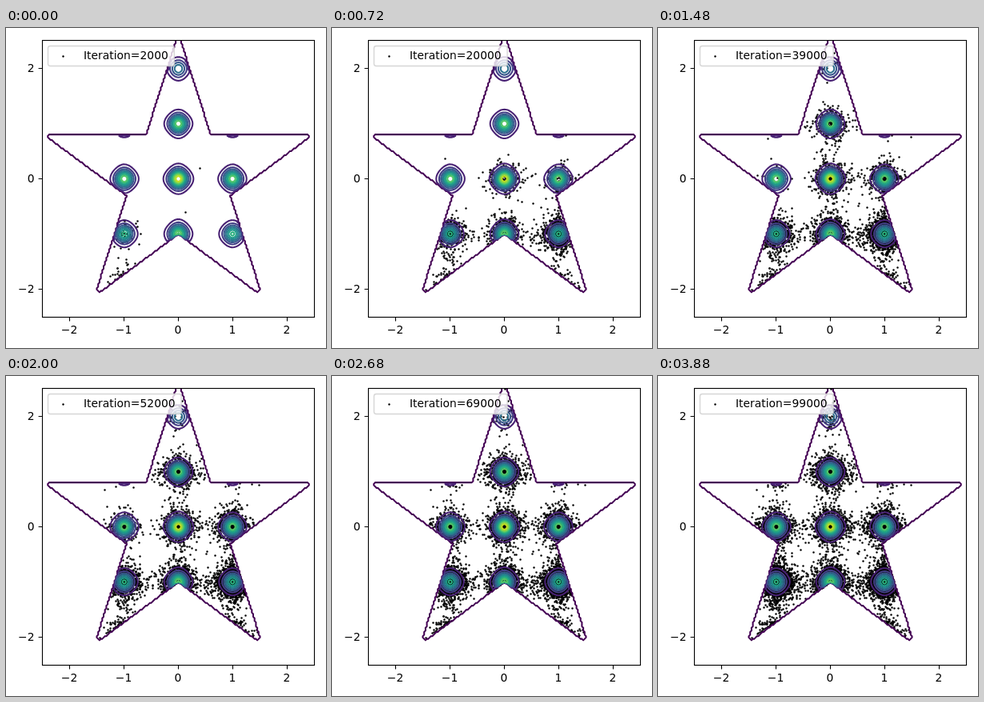
Recreate the animation shown at these times as an HTML page with a canvas. Size 400 px wide and 400 px high, loop 3.92 s.

```html
<!DOCTYPE html>
<html lang="en">
<head>
<meta charset="utf-8">
<title>Sampling a star-shaped density</title>
<style>
  html, body { margin: 0; width: 100%; height: 100%; overflow: hidden; background: #fff; }
  canvas { display: block; width: 400px; height: 400px; }
</style>
</head>
<body>
<canvas id="stage" width="400" height="400"></canvas>
<script>
const SIZE = 400, STEP = 40, STEPS = 98;
const BOX = { l: 45.5, t: 15.5, w: 340, h: 346 };
const FONT = '13.89px "DejaVu Sans", sans-serif';
const TEMP = 4.9, HEAT = 5.4;

// Cumulative sample counts per basin, at these steps
const KEYS = [0, 18, 37, 50, 67, 97];
const BASINS = [
  [-1, -1, 60, 450, 850, 950, 1400, 2300],
  [0, -1, 3, 500, 900, 1000, 1100, 1400],
  [1, -1, 0, 950, 1600, 1800, 1900, 2200],
  [0, 0, 1, 300, 700, 900, 1200, 1500],
  [1, 0, 0, 130, 500, 900, 1050, 1400],
  [-1, 0, 0, 2, 25, 220, 700, 1200],
  [0, 1, 0, 0, 400, 700, 1000, 1300],
  [0, 2, 0, 0, 15, 25, 40, 70],
  [-1, 1, 0, 0, 1, 4, 14, 28],
  [1, 1, 0, 1, 4, 9, 12, 20],
  [-1.3, -1.9, 25, 40, 50, 55, 60, 75],
  [1.3, -1.9, 0, 30, 50, 55, 60, 75]
];

// Viridis at multiples of 1/11
const COLORS = ['#440154', '#482173', '#433e85', '#38588c', '#2d708e', '#25858e',
  '#1e9b8a', '#2ab07f', '#52c569', '#86d549', '#c2df23'];

const px = x => BOX.l + (x + 2.5) / 5 * BOX.w;
const py = y => BOX.t + (2.5 - y) / 5 * BOX.h;

function layer() {
  const c = document.createElement('canvas');
  c.width = c.height = SIZE;
  return c.getContext('2d');
}

function random(seed) {
  return () => {
    seed = seed + 0x6D2B79F5 | 0;
    let t = Math.imul(seed ^ seed >>> 15, 1 | seed);
    t = t + Math.imul(t ^ t >>> 7, 61 | t) ^ t;
    return ((t ^ t >>> 14) >>> 0) / 4294967296;
  };
}

// A pentagram point lies inside at least four of its five edge lines; the tips are blunt
const EDGES = [0, 1, 2, 3, 4].map(k => {
  const a = Math.PI * (0.5 + 0.4 * k);
  return [Math.cos(a), Math.sin(a)];
});
const REACH = 0.799, RADIUS = 2.505;
const inStar = (x, y) => Math.hypot(x, y) < RADIUS &&
  EDGES.filter(([a, b]) => a * x + b * y <= REACH).length >= 4;

const hill = v => v * v + 10 * (1 - Math.cos(2 * Math.PI * v));
const energy = (x, y) => hill(x) + hill(y);
const density = (x, y) => inStar(x, y) ? Math.exp(-energy(x, y) / TEMP) : 0;

function contours(g) {
  const n = 200, at = i => (i - n / 2) / 40;
  const grid = [];
  for (let j = 0; j <= n; j++) {
    grid.push(Array.from({ length: n + 1 }, (_, i) => density(at(i), at(j))));
  }
  g.lineWidth = 2.05;
  g.lineCap = 'round';
  COLORS.forEach((color, k) => {
    const level = k / COLORS.length;
    g.beginPath();
    for (let j = 0; j < n; j++) for (let i = 0; i < n; i++) {
      const corners = [[i, j], [i + 1, j], [i + 1, j + 1], [i, j + 1]];
      const cuts = [];
      corners.forEach(([x0, y0], c) => {
        const [x1, y1] = corners[(c + 1) % 4];
        const a = grid[y0][x0], b = grid[y1][x1];
        if ((a > level) === (b > level)) return;
        const t = (level - a) / (b - a);
        cuts.push([px(at(x0 + (x1 - x0) * t)), py(at(y0 + (y1 - y0) * t))]);
      });
      for (let c = 0; c < cuts.length; c += 2) {
        g.moveTo(...cuts[c]);
        g.lineTo(...cuts[c + 1]);
      }
    }
    g.strokeStyle = color;
    g.stroke();
  });
}

function axes(g) {
  g.strokeStyle = g.fillStyle = '#000';
  g.lineWidth = 1.11;
  g.lineCap = 'butt';
  g.font = FONT;
  g.strokeRect(BOX.l, BOX.t, BOX.w, BOX.h);
  const bottom = BOX.t + BOX.h;
  const label = v => String(v).replace('-', '\u2212');
  g.beginPath();
  for (let v = -2; v <= 2; v++) {
    const x = px(v);
    g.moveTo(x, bottom);
    g.lineTo(x, bottom + 4.9);
    g.textAlign = 'center';
    g.fillText(label(v), x - 0.5, 382);
    if (v % 2) continue;
    const y = Math.floor(py(v)) + 0.5;
    g.moveTo(BOX.l, y);
    g.lineTo(BOX.l - 4.9, y);
    g.textAlign = 'right';
    g.fillText(label(v), 35.5, y + 4.5);
  }
  g.stroke();
}

function dot(g, x, y) {
  g.beginPath();
  g.arc(x, y, 1.2, 0, 2 * Math.PI);
  g.fill();
}

function legend(g, text) {
  g.font = FONT;
  g.textAlign = 'left';
  const w = 97 + g.measureText(text).width + 7 - 52;
  g.beginPath();
  g.roundRect(52.5, 22.5, w, 25, 2.8);
  g.fillStyle = 'rgba(255,255,255,0.8)';
  g.fill();
  g.strokeStyle = 'rgba(204,204,204,0.8)';
  g.lineWidth = 1.39;
  g.stroke();
  g.fillStyle = '#000';
  dot(g, 71.5, 35.5);
  g.fillText(text, 97, 39);
}

// Rejection sampling inside the unit cell around each peak
const rand = random(11);
const samples = BASINS.map(([cx, cy, ...counts]) => {
  const floor = cx * cx + cy * cy, pts = [];
  while (pts.length < counts[counts.length - 1]) {
    const x = cx + rand() - 0.5, y = cy + rand() - 0.5;
    if (rand() < Math.exp((floor - energy(x, y)) / HEAT) && inStar(x, y)) {
      pts.push([Math.round(px(x)) + 0.5, Math.round(py(y)) + 0.5]);
    }
  }
  return { pts, counts };
});

function countAt(counts, step) {
  let k = 0;
  while (k < KEYS.length - 2 && step > KEYS[k + 1]) k++;
  const t = (step - KEYS[k]) / (KEYS[k + 1] - KEYS[k]);
  return Math.round(counts[k] + (counts[k + 1] - counts[k]) * t);
}

const plot = layer();
plot.save();
plot.beginPath();
plot.rect(BOX.l, BOX.t, BOX.w, BOX.h);
plot.clip();
contours(plot);
plot.restore();
axes(plot);

const cloud = layer();
const stage = document.getElementById('stage').getContext('2d');
let shown = -1;

function draw(step) {
  if (step < shown) {
    cloud.clearRect(0, 0, SIZE, SIZE);
    shown = -1;
  }
  for (const { pts, counts } of samples) {
    const from = shown < 0 ? 0 : countAt(counts, shown);
    for (const [x, y] of pts.slice(from, countAt(counts, step))) dot(cloud, x, y);
  }
  shown = step;
  stage.fillStyle = '#fff';
  stage.fillRect(0, 0, SIZE, SIZE);
  stage.drawImage(cloud.canvas, 0, 0);
  stage.drawImage(plot.canvas, 0, 0);
  legend(stage, 'Iteration=' + (step + 2) * 1000);
}

const start = performance.now();
function tick() {
  const step = Math.floor((performance.now() - start) / STEP) % STEPS;
  if (step !== shown) draw(step);
  requestAnimationFrame(tick);
}
tick();
</script>
</body>
</html>
```
